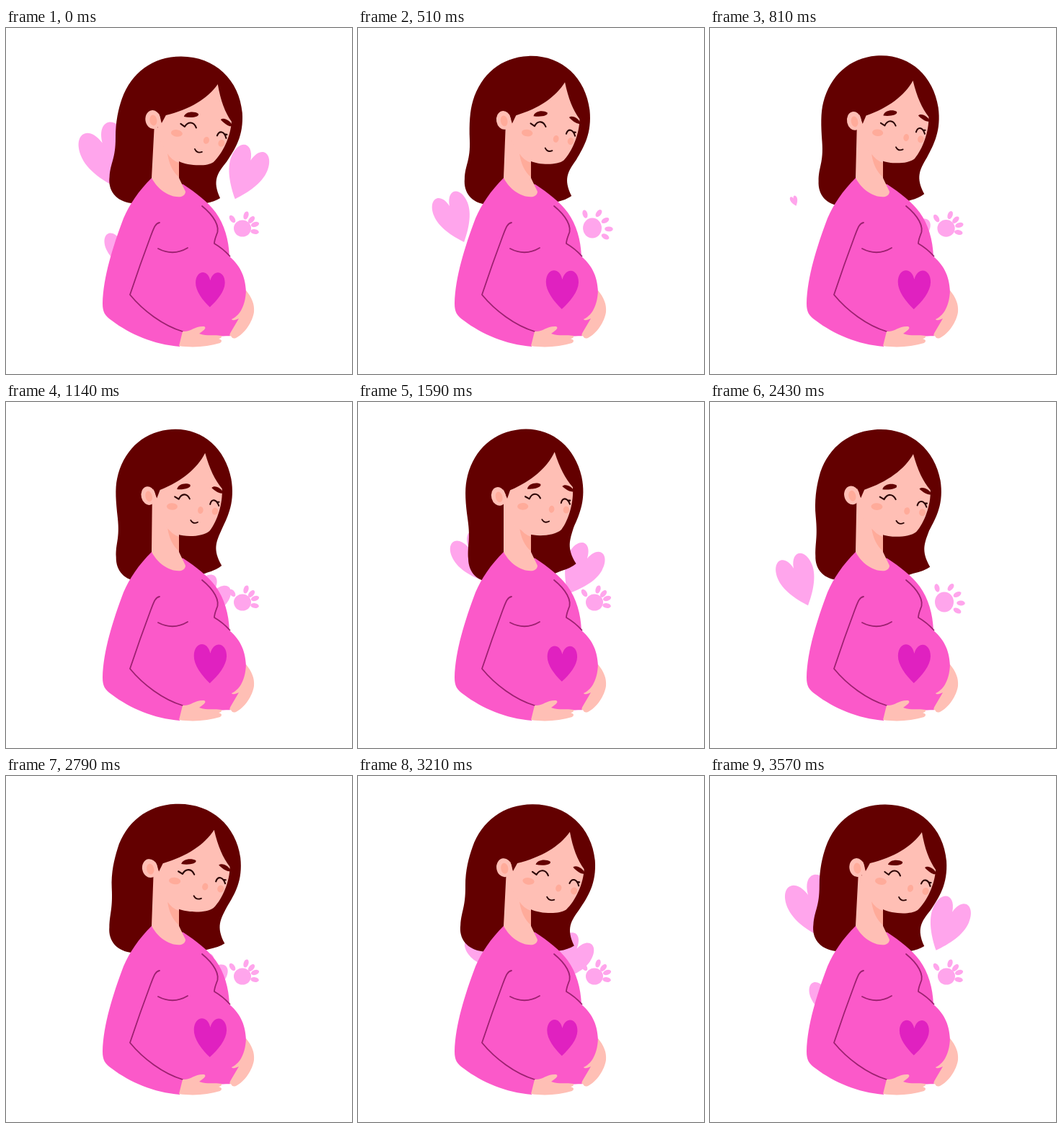
Write an HTML page with a canvas that moves like this. It is 480 px wide and 480 px high and loops after 3.6 s.

```html
<!DOCTYPE html>
<html lang="en">
<head>
<meta charset="utf-8">
<title>Expecting</title>
<style>
  html, body { margin: 0; width: 100%; height: 100%; overflow: hidden; background: #fff; }
  canvas { display: block; width: 480px; height: 480px; }
</style>
</head>
<body>
<canvas id="stage" width="480" height="480"></canvas>
<script>
const ctx = document.getElementById('stage').getContext('2d');
const LOOP = 3600, HALF = LOOP / 2, RAD = Math.PI / 180;
const HAIR = '#630000', SKIN = '#ffbfb5', BLUSH = '#ffab9a', SWEATER = '#fb59c9',
      SEAM = '#9c2170', DEEP = '#e021c0', PALE = '#ffa5ec', INK = '#2a0303';

const mod = (a, n) => ((a % n) + n) % n;
const mix = (a, b, k) => a + (b - a) * k;
const smooth = u => u * u * (3 - 2 * u);
const power = n => u => Math.pow(u, n);

function fill(path, color) {
  ctx.fillStyle = color;
  ctx.fill(path instanceof Path2D ? path : new Path2D(path));
}

function line(path, color, width) {
  ctx.strokeStyle = color;
  ctx.lineWidth = width;
  ctx.lineCap = ctx.lineJoin = 'round';
  ctx.stroke(new Path2D(path));
}

function oval(x, y, rx, ry, color, degrees = 0) {
  ctx.beginPath();
  ctx.ellipse(x, y, rx, ry, degrees * RAD, 0, Math.PI * 2);
  ctx.fillStyle = color;
  ctx.fill();
}

const heartShape = new Path2D(
  'M0 1.15C-.5 .7 -1 .1 -1 -.45C-1 -1.25 -.2 -1.4 0 -.6' +
  'C.2 -1.4 1 -1.25 1 -.45C1 .1 .5 .7 0 1.15Z');

function heart(x, y, sx, sy, degrees, color) {
  if (sx <= 0) return;
  ctx.save();
  ctx.translate(x, y);
  ctx.rotate(degrees * RAD);
  ctx.scale(sx, sy);
  fill(heartShape, color);
  ctx.restore();
}

// Each heart drifts out from behind the body, then shrinks away.
const SHRINK = 150;
const floaters = [
  { start: 800, rise: 1000, life: 1000, ease: power(2.1),
    from: [272, 284], to: [332, 202], size: [24, 27], turn: [40, 22] },
  { start: 1300, rise: 700, life: 800, ease: smooth,
    from: [180, 250], to: [136, 166], size: [20, 38], turn: [-36, -23] },
  { start: 1600, rise: 890, life: 890, ease: power(1.7),
    from: [170, 316], to: [117, 240], size: [23, 26], turn: [-24, -21] }
];

function drawFloater(f, t) {
  const age = mod(t - f.start, HALF);
  if (age > f.life + SHRINK) return;
  const k = f.ease(Math.min(1, age / f.rise));
  const left = 1 - Math.max(0, age - f.life) / SHRINK;
  const size = mix(f.size[0], f.size[1], k) * left;
  heart(mix(f.from[0], f.to[0], k), mix(f.from[1], f.to[1], k),
        size, size * 1.23, mix(f.turn[0], f.turn[1], k), PALE);
}

// Toes: resting place, spread place, tilt.
const toes = [
  [314, 265, 315, 258, 55], [333, 260, 334, 257, -72], [340.5, 266, 343, 267, -48],
  [345.5, 272.5, 348, 279, -18], [345, 282.5, 343, 289.5, 8]
];

function drawPaw(t) {
  const u = (mod(t, HALF) - 330) / 540;
  const k = u > 0 && u < 1 ? Math.min(1, 1.3 * Math.sin(Math.PI * u) ** 2) : 0;
  oval(mix(328, 325, k), mix(278, 277.5, k), mix(12, 13, k), mix(11.5, 14, k), PALE);
  for (const [x0, y0, x1, y1, tilt] of toes)
    oval(mix(x0, x1, k), mix(y0, y1, k), 5.8, 3.4, PALE, tilt + 20 * k);
}

// The head tilts on the neck and narrows a little as it turns.
function inHead(p, sway, draw) {
  ctx.save();
  ctx.translate(238, 0);
  ctx.scale(1 - 0.03 * sway - 0.04 * p, 1);
  ctx.translate(-13, 205);
  ctx.rotate(-8.5 * RAD * p);
  ctx.translate(-225, -205);
  draw();
  ctx.restore();
}

function drawHair(p, sway) {
  const mid = 2 * p + 2 * sway, low = 4 * p, right = 6 * p - 2 * sway;
  fill(`M243 39.5C290 39.5 324 72 328 118C330 150 318 168 306 186
    C${293 + right} 202 ${286 + right} 212 ${297 + right} 236
    Q${289 + right} 241 278 243L240 252L${174 + low} 243
    C${152 + low} 240 ${141 + low} 225 ${143.5 + low} 206
    C${145 + low} 186 ${152 + mid} 182 ${152 + mid} 152
    C${152 + mid} 130 156 112 161 98C174 62 204 39.5 243 39.5Z`, HAIR);
}

function drawFace() {
  fill(`M294 78C280 98 255 113 222 121L216 132L212 118L210 150L224 174L240 185
    C252 191 278 193 288 186C301 174 312 150 313 130C304 117 298 101 294 78Z`, SKIN);
  oval(204, 127, 10.5, 13, SKIN, -8);
  oval(204.5, 128, 5, 7.5, BLUSH, -8);
  oval(237, 146, 8, 4.8, BLUSH, 8);
  oval(299, 160, 4.5, 5, BLUSH, 15);
  oval(278, 156, 4, 5, BLUSH, 15);
  fill('M247 123C249 116 261 115 267 119C269 124 256 125 247 123Z', HAIR);
  fill('M298 127C303 123 313 130 314 136C310 138 302 132 298 127Z', HAIR);
  line('M242.5 133L248 137C253 129 261 130 264 138.5', INK, 2.1);
  line('M293 149.5C296 142 303 143 305.5 153M303 147.5L306.5 148', INK, 2.1);
  line('M262 168Q265 174.5 272 172', INK, 1.8);
}

function drawBody() {
  fill(`M202 208C184 226 171 245 163 264C148 304 135 345 134 382
    C134 394 137 399 147 406C172 425 205 439 241 442L246 422
    C270 428 295 428 314 427C326 410 334 390 333 366
    C332 342 323 328 310 317C309 293 303 273 291 256C280 241 264 229 246 217Z`, SWEATER);
}

function drawNeck(p) {
  fill(`M${206 - 4 * p} 132L202 208C211 225 228 236 243 234Q249 232 249 227
    L240 208L240 178Z`, SKIN);
  fill('M224 174Q229 183 240 187L240 207Q227 196 224 174Z', BLUSH);
}

function drawSeams() {
  line('M213 270C207 271 205 278 201 288C192 312 181 343 172 370C190 392 218 413 245 421', SEAM, 1.8);
  line('M211 306Q232 317 252 305', SEAM, 1.8);
  line('M272 247C288 260 298 276 292 287Q289 295 289 299Q301 306 310.5 316.5', SEAM, 1.8);
}

function drawHands() {
  fill(`M245 421C256 422 262 413 275 414Q279 416 272 421L268 424
    C279 428 290 425 299 427Q300 430 295 431Q302 433 297 437
    C280 442 260 444 240 441Z`, SKIN);
  fill(`M333 364C341 374 345 383 344 394C342 408 331 424 319 430
    Q314 432 312 427Q308 428 313 420L323 403Q314 407 313 404C322 400 332 389 333 364Z`, SKIN);
}

function draw(now) {
  const t = mod(now, LOOP);
  const turn = Math.PI * 2 / LOOP;
  const p = (1 - Math.cos(turn * (t + 120))) / 2;
  const sway = Math.sin(turn * t);
  const beat = 20.3 + 2.4 * Math.sin(Math.PI * 11 * t / LOOP) ** 2;

  ctx.fillStyle = '#fff';
  ctx.fillRect(0, 0, 480, 480);
  floaters.forEach(f => drawFloater(f, t));
  drawPaw(t);
  inHead(p, sway, () => drawHair(p, sway));
  drawBody();
  drawNeck(p);
  inHead(p, sway, drawFace);
  drawSeams();
  heart(283.2, 363, beat, beat * 1.04, 1, DEEP);
  drawHands();
}

const begin = performance.now();
function tick() {
  draw(performance.now() - begin);
  requestAnimationFrame(tick);
}
tick();
</script>
</body>
</html>
```
